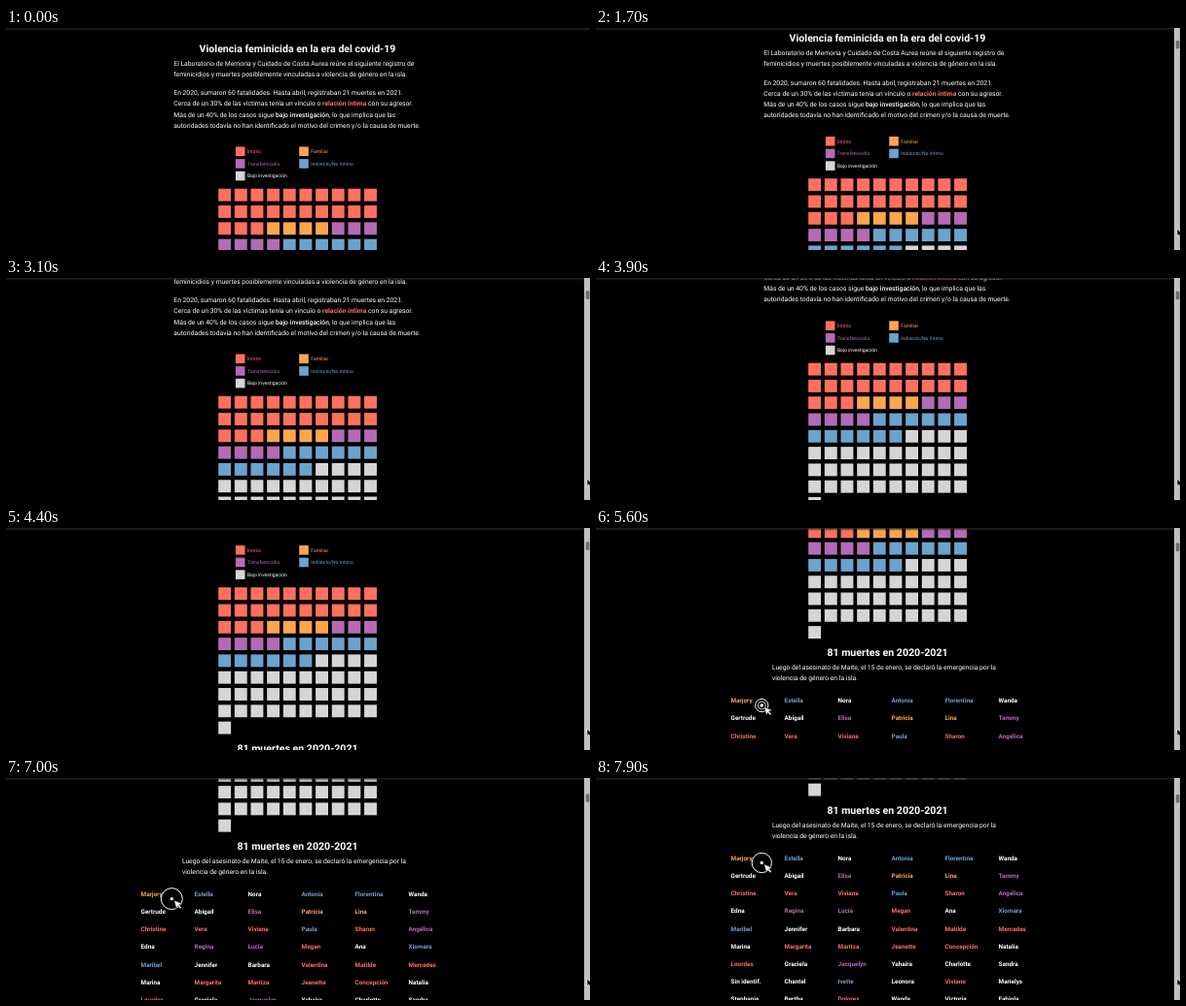
Write an HTML page that moves like this. It is 600 px wide and 229 px high and loops after 8000 ms.

```html
<!DOCTYPE html>
<html lang="es">
<head>
<meta charset="utf-8">
<title>Violencia feminicida</title>
<style>
  html, body { margin: 0; width: 100%; height: 100%; overflow: hidden; background: #000; }
  svg { display: block; width: 600px; height: 229px; background: #000; }
  text { font-family: Roboto, sans-serif; text-rendering: geometricPrecision; fill: #fff; }
  .bold { font-weight: 700; }
  .semi { font-weight: 500; }
</style>
</head>
<body>
<svg id="stage" viewBox="0 0 600 229">
  <defs>
    <linearGradient id="topShade" x2="0" y2="1">
      <stop stop-color="#262626"/>
      <stop offset="1" stop-color="#262626" stop-opacity="0"/>
    </linearGradient>
  </defs>
  <g id="page">
    <g id="hint" fill="none" stroke="#fff" transform="translate(170.3 386)">
      <circle id="outerRing" stroke-width="1"/>
      <circle id="innerRing" stroke-width=".8"/>
      <circle r="1.7" fill="#fff" stroke="none"/>
      <path d="M2.3 1.6 L10.8 5 L7.4 6.3 L10 9 L8.7 10.2 L6.1 7.5 L4.9 10.6 Z" fill="#fff" stroke="#000" stroke-width=".5"/>
    </g>
  </g>
  <rect width="600" height="3" fill="url(#topShade)"/>
  <g id="scrollbar">
    <rect x="594" width="6" height="229" fill="#c0c0c0"/>
    <rect id="thumb" x="595.7" y="12.5" width="3.8" height="9" rx="1.8" fill="#707070"/>
  </g>
  <path id="cursor" d="M0 0 V7.5 L1.8 5.9 L3 8.4 L4.2 7.9 L3.1 5.4 H5.3 Z" fill="#000" stroke="#fff" stroke-width=".6"/>
</svg>
<script>
const LOOP = 8000, STEP = 100;
const COLORS = { r: '#ff705f', o: '#ffa64d', p: '#b46bb4', b: '#6ba3cd', g: '#d5d5d5', w: '#fff' };
const $ = id => document.getElementById(id);
const page = $('page'), hint = $('hint');

function add(tag, attrs, content = '') {
  const el = document.createElementNS('http://www.w3.org/2000/svg', tag);
  for (const key in attrs) el.setAttribute(key, attrs[key]);
  el.innerHTML = content;
  page.insertBefore(el, hint);
}

// y is the middle of the capital letters
function label(content, x, y, size, { color = 'w', weight = '', anchor = 'start' } = {}) {
  add('text', { x, y: y + size * .355, 'font-size': size, class: weight,
    'text-anchor': anchor, style: `fill:${COLORS[color]}` }, content);
}

function square(x, y, size, color) {
  add('rect', { x, y: y - size / 2, width: size, height: size, fill: COLORS[color] });
}

const heading = (content, y) => label(content, 299.5, y, 10.6, { weight: 'bold', anchor: 'middle' });
const paragraph = (lines, x, y) => lines.forEach((line, i) => label(line, x, y + i * 11.05, 6.78));

heading('Violencia feminicida en la era del covid-19', 21);
paragraph([
  'El Laboratorio de Memoria y Cuidado de Costa Aurea reúne el siguiente registro de',
  'feminicidios y muertes posiblemente vinculadas a violencia de género en la isla.'
], 172.3, 36.5);
paragraph([
  'En 2020, sumaron 60 fatalidades. Hasta abril, registraban 21 muertes en 2021.',
  `Cerca de un 30% de las víctimas tenía un vínculo o <tspan class="bold" style="fill:${COLORS.r}">relación íntima</tspan> con su agresor.`,
  'Más de un 40% de los casos sigue <tspan class="semi">bajo investigación</tspan>, lo que implica que las',
  'autoridades todavía no han identificado el motivo del crimen y/o la causa de muerte.'
], 172.3, 67);

[['Íntimo', 'r'], ['Familiar', 'o'], ['Transfemicidio', 'p'],
 ['Indirecto/No íntimo', 'b'], ['Bajo investigación', 'g']].forEach(([name, color], i) => {
  const x = 235.9 + i % 2 * 65.3, y = 127.3 + Math.floor(i / 2) * 12.65;
  square(x, y, 9.6, color);
  label(name, x + 12, y, 5.05, { color: color === 'g' ? 'w' : color });
});

const cases = 'r'.repeat(23) + 'o'.repeat(4) + 'p'.repeat(7) + 'b'.repeat(12) + 'g'.repeat(35);
[...cases].forEach((color, i) =>
  square(218.2 + i % 10 * 16.65, 172.2 + Math.floor(i / 10) * 17.3, 12.9, color));

heading('81 muertes en 2020-2021', 331.3);
paragraph([
  'Luego del asesinato de Maite, el 15 de enero, se declaró la emergencia por la',
  'violencia de género en la isla.'
], 180.9, 346.8);

const people = [
  ['obwbbw', 'Marjory,Estella,Nora,Antonia,Florentina,Wanda'],
  ['wwpoop', 'Gertrude,Abigail,Elisa,Patricia,Lina,Tammy'],
  ['rrrbrp', 'Christine,Vera,Viviana,Paula,Sharon,Angélica'],
  ['wpprwb', 'Edna,Regina,Lucía,Megan,Ana,Xiomara'],
  ['bwwrrr', 'Maribel,Jennifer,Barbara,Valentina,Matilde,Mercedes'],
  ['wrrrrw', 'Marina,Margarita,Maritza,Jeanette,Concepción,Natalia'],
  ['rwpwww', 'Lourdes,Graciela,Jacquelyn,Yahaira,Charlotte,Sandra'],
  ['wwbwrw', 'Sin identif.,Chantel,Ivette,Leonora,Viviana,Marielys'],
  ['wwrwww', 'Stephania,Bertha,Dolores,Wanda,Victoria,Fabiola']
];
people.forEach(([colors, names], row) => names.split(',').forEach((name, col) =>
  label(name, 138.6 + col * 55, 381 + row * 18.2, 6.35, { color: colors[col], weight: 'bold' })));

// [time, scroll position]
const scrollKeys = [[0, 0], [1400, 0], [1700, 10.5], [2300, 33], [2900, 33], [3100, 44], [3700, 76],
  [3800, 76], [4400, 104.5], [4900, 104.5], [5600, 203], [6300, 230], [7900, 298.5], [8000, 301]];
const slope = i => (scrollKeys[i + 1][1] - scrollKeys[i][1]) / (scrollKeys[i + 1][0] - scrollKeys[i][0]);

// Harmonic mean of the neighbouring slopes keeps the curve monotone
function tangent(i) {
  if (i === 0 || i === scrollKeys.length - 1) return 0;
  const a = slope(i - 1), b = slope(i);
  return a * b ? 2 * a * b / (a + b) : 0;
}

function scrollAt(t) {
  const i = scrollKeys.findIndex((key, n) => t < scrollKeys[n + 1][0]);
  const [t0, y0] = scrollKeys[i], [t1, y1] = scrollKeys[i + 1];
  const span = t1 - t0, u = (t - t0) / span, v = 1 - u;
  return y0 * (1 + 2 * u) * v * v + y1 * u * u * (3 - 2 * u)
    + span * u * v * (tangent(i) * v - tangent(i + 1) * u);
}

function render(now) {
  const t = Math.floor(now % LOOP / STEP) * STEP;
  const scroll = scrollAt(t);
  page.setAttribute('transform', `translate(0 ${-scroll})`);

  // The inner ring fades out as the pulse opens
  const radius = 8.8 - 2.3 * Math.sin(2 * Math.PI * (t - 300) / 1000);
  $('outerRing').setAttribute('r', radius);
  $('innerRing').setAttribute('r', radius * .6);
  $('innerRing').setAttribute('opacity', Math.min(1, Math.max(0, (10.2 - radius) / 2)));

  $('scrollbar').style.display = t < 1500 ? 'none' : '';
  $('thumb').setAttribute('y', 12.5 + scroll * .014);

  const entry = Math.min(1, Math.max(0, (t - 300) / 1000));
  const left = (1 - entry) ** 2;
  $('cursor').setAttribute('transform', `translate(${597 - 22 * left} ${207 + 24 * left})`);
  requestAnimationFrame(render);
}
requestAnimationFrame(render);
</script>
</body>
</html>
```
